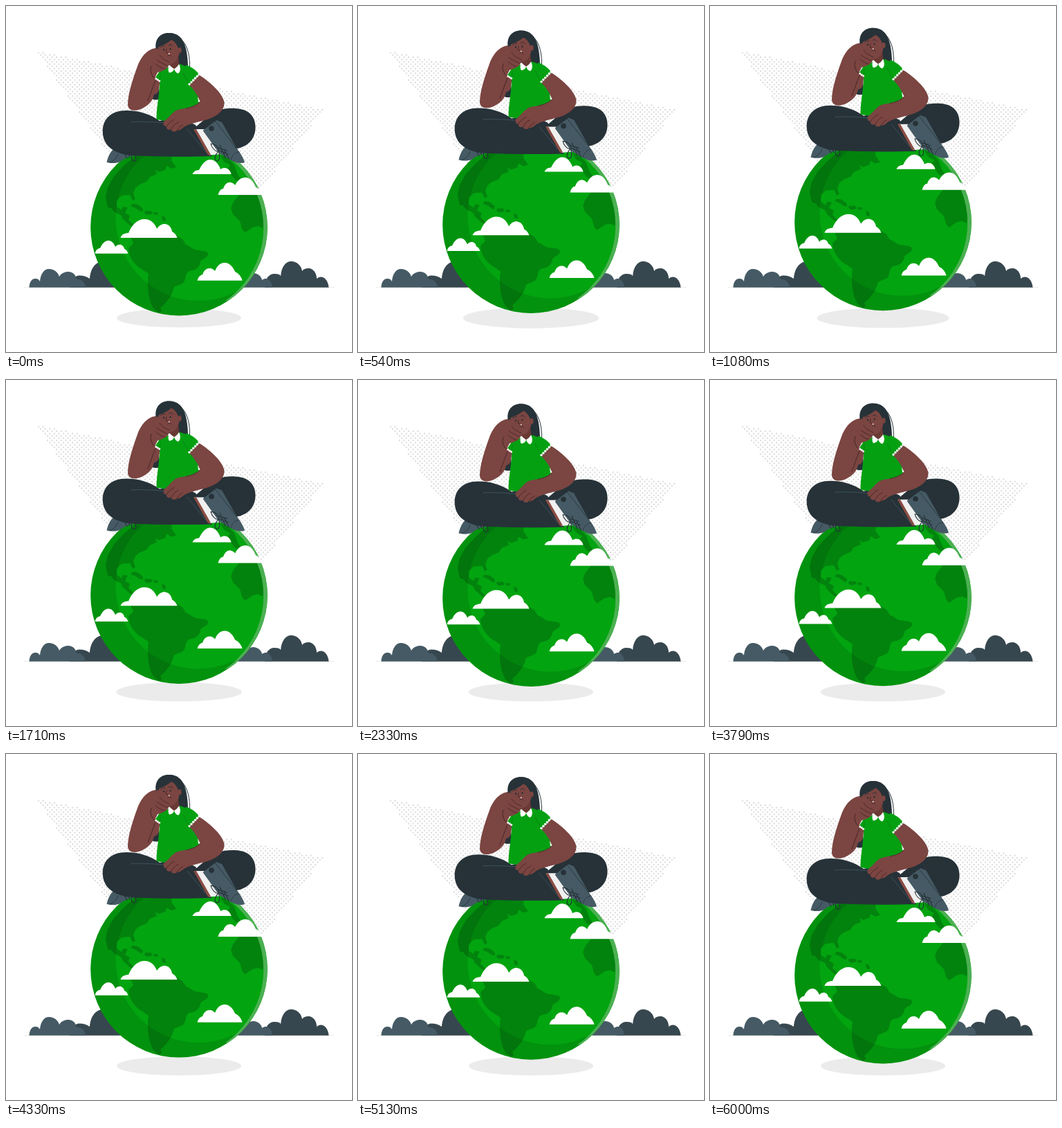
An HTML page with a canvas that plays this animation: 500 by 500 pixels, repeating every 6040 ms.

```html
<!DOCTYPE html>
<html lang="en">
<head>
<meta charset="utf-8">
<title>Thinking on top of the world</title>
<style>
html, body { margin: 0; width: 100%; height: 100%; overflow: hidden; background: #fff; }
canvas { display: block; width: 100vw; height: 100vh; }
</style>
</head>
<body>
<canvas id="stage"></canvas>
<script>
const canvas = document.getElementById('stage');
const ctx = canvas.getContext('2d');
const LOOP = 6040, FPS = 24, LAST = 144;
const INK = '#263238', SLATE = '#455a64', DARK = '#37474f';
const GREEN = '#02a410', SKIN = '#7b4541', LINE = '#3f2325';

function fill(d, color) {
  ctx.fillStyle = color;
  ctx.fill(d instanceof Path2D ? d : new Path2D(d));
}
function stroke(d, color, width) {
  ctx.strokeStyle = color;
  ctx.lineWidth = width;
  ctx.stroke(new Path2D(d));
}
function disc(x, y, rx, ry = rx) {
  const p = new Path2D();
  p.ellipse(x, y, rx, ry, 0, 0, Math.PI * 2);
  return p;
}

// Piecewise linear keyframes: [position, value]
function track(keys, p) {
  for (let i = 1; i < keys.length; i++) {
    const [a, va] = keys[i - 1], [b, vb] = keys[i];
    if (p <= b) return va + (vb - va) * (p - a) / (b - a);
  }
  return keys[keys.length - 1][1];
}
const FLOAT = [[0, 0], [0.5, -10], [1, 0]];
const BEAT = [[0, 1], [0.1, 1.1], [0.3, 1], [0.4, 1], [0.5, 1.1], [0.6, 1], [1, 1]];

// Staggered dots inside a triangle
function makeDots() {
  const p = new Path2D(), dx = 6.56, dy = 3.3;
  for (let r = 0; r < 97; r++) {
    const y = 67.5 + r * dy;
    const left = 45 + 0.703 * (y - 67);
    const right = y < 151 ? 46 + (y - 65.8) * 4.93 : 459 - 0.789 * (y - 150);
    for (let c = 0; c < 64; c++) {
      const x = 47 + (c + (r % 2) / 2) * dx;
      if (x < left || x > right) continue;
      p.moveTo(x + 1.25, y);
      p.arc(x, y, 1.25, 0, Math.PI * 2);
    }
  }
  return p;
}
const dots = makeDots();

function backdrop() {
  fill(dots, '#dfdfdf');
  fill('M25 406.4H475V406.9H25Z', '#dcdcdc');
  // left bushes
  fill('M92 406.8C94 396 99 390 105 389.5C111 389 117 391 121 394C122 380 129 369.5 140 369C155 369 168 385 168 406.8Z', DARK);
  fill('M33.5 406.8C34 398 38 393.5 43 394C46 394 48 396 49 398C50 387 55 380 62 380C70 380 75 385 77 391C80 386 85 384 90 384C97 384 101 389 102 395C108 394 114 399 115 406.8Z', SLATE);
  // right bushes
  fill('M374 406.8C374 394 380 387 388 387C393 387 396 388 397 390C398 377 404 369 412 369C421 369 427 376 428 383C430 380 433 379 437 379C444 379 449 386 449 394C456 388 465 393 466.5 406.8Z', DARK);
  fill('M335 406.8C340 392 350 386 358 386C365 387 369 391 370 396C377 391 384 396 385 406.8Z', SLATE);
}

function shadow(scale) {
  fill(disc(250, 450.8, 90 * scale, 13.7 * scale), '#ebebeb');
}

const LAND = [
  // North and Central America
  'M186 217L205 212L240 212L239 223L246 233L239 235L232 231L230 237L221 240L216 237L218 243L208 247L203 254L193 258L187 263L184 271L187 279L183 281L179 273L167 274L160 281L160 290L167 295L169 290L176 291L172 299L179 303L177 309L186 318L180 318L169 308L166 302L157 298L152 292L147 291L144 276L147 262L156 246L170 231Z',
  // Caribbean
  'M181 287C188 284 192 288 198 293L197 297C191 297 190 291 181 290Z',
  'M201 296L210 296L212 300L204 302L200 299Z',
  'M213 298L219 298L220 301L215 302Z',
  'M225 303L230 305L231 311L226 310Z',
  // South America
  'M179 332L184 343L177 350C177 362 185 374 197 381L206 387C203 404 206 425 213 437L221 444L225 441L223 436C228 432 236 424 240 415L243 406L255 401C262 396 257 387 265 383C274 382 280 378 281 369C285 364 292 364 292 358C292 353 281 354 273 352C267 349 264 346 260 345L255 337L245 331L230 330Z',
  // Africa
  'M328 284L338 271L368 271C374 288 375 304 371 321L364 318L356 320L346 327C341 325 340 318 338 311L328 301L325 292Z',
  // Europe
  'M309 215L320 219L330 230L335 244L341 252L332 252L327 246L320 236L324 230L315 225Z'
];

const CLOUDS = [
  'M269.5 243C271 239 275 237 279 237C283 229 288 222 295 222C302 222 307 228 310 236C316 232 323 234 325.5 243Z',
  'M306.5 273C308 267 311 264 314 264C316 257 321 254 325 255C328 256 330 257 331 259C335 251 340 247.7 346 247.7C354 248 358 255 361 262C365 263 368 267 370 273Z',
  'M165.5 334.9C167 330 172 328 177 328C182 316 190 308 200 308C209 308 215 314 218 322C221 317 226 314.5 230 315C236 316 239 320 240 326C244 328 246 331 247.5 334.9Z',
  'M128.5 357.7C130 352 133 350 136 350C139 343 143 339 148 339C153 339 156 343 158 348C163 342 170 345 171 351C174 352 175 354 176.5 357.7Z',
  'M276.5 396.7C278 391 281 389 284 388C286 382 290 379 294 379C298 379 300 381 302 383C305 375 310 371 316 371C323 371 328 377 331 384C336 386 340 391 341.5 396.7Z'
];

function outside(cx, cy, r, color) {
  const p = new Path2D();
  p.rect(100, 170, 300, 300);
  p.addPath(disc(cx, cy, r));
  ctx.fillStyle = color;
  ctx.fill(p, 'evenodd');
}

function globe() {
  const ball = disc(250, 319.7, 127.8);
  fill(ball, GREEN);
  ctx.save();
  ctx.clip(ball);
  LAND.forEach(d => fill(d, 'rgba(0,0,0,.2)'));
  outside(278, 306.5, 119.5, 'rgba(0,0,0,.11)');
  ctx.beginPath();
  ctx.rect(300, 200, 90, 226);
  ctx.clip();
  outside(244, 320.7, 128.2, '#4cb052');
  ctx.restore();
  CLOUDS.forEach(d => fill(d, '#fff'));
}

function legs() {
  // shoe on the left
  fill('M145.5 226C147 219 150 212 155 207L190 209L188 216C176 217 170 221 165 225C159 228 150 227 145.5 226Z', SLATE);
  stroke('M150 226C157 224 160 219 162 214', INK, 0.8);
  // far leg, then near leg
  fill('M288 163C299 151 315 147 331 148C351 148.5 360.5 160 360.5 175C360.5 194 347 205 330 206.5L290 212L268 180Z', INK);
  fill('M222 166C207 155 190 151 174 151C151 151 139.7 164 139.7 181C139.7 202 156 214.5 185 216.3C220 218 262 218 298 217L274 172L250 160Z', INK);
  stroke('M181 167.5C200 166.5 216 168 232 169M262 178L289 211', SLATE, 0.8);
  // laces on the left
  stroke('M169 210L175 220M174 209L179 219M181 210C187 215 190 222 186 224C181 225 180 217 183 210M178 212L190 216', INK, 1.1);
}

function laptop() {
  fill('M272 178L286 178L311 214L294 215.5Z', '#f0f0f0');
  fill('M271 178L275 178L296 215L292 215.5Z', '#8a4c44');
  fill('M284.5 180L304 165L312 168L333 205C339 213 343 219 345 226C337 229 327 225 319 219L308 213Z', SLATE);
  stroke('M302 166L334 207', INK, 0.8);
  fill(disc(297, 177), INK);
  fill(disc(297, 177, 3.8), INK);
  stroke('M296 199C303 199 309 206 307 210C302 211 297 204 296 199M306 211C301 217 301 223 305 224C310 223 309 215 307 210M307 205L319 209M308 209L321 214M309 201L317 219M315 207L322 221', INK, 1.1);
  stroke('M325 222C327 215 331 211 337 211', INK, 0.7);
}

function torso() {
  fill('M211 127L221 118L223 134C219 136 214 136 211 134Z', INK);
  // hair behind the neck
  fill('M217 62C215.5 49 223 39 236 39C248 39 254 46 257 53C261 61 263 76 263 91L250 92L232 84Z', INK);
  stroke('M255 50C263 59 266 73 265.5 91', INK, 1);
  // neck
  fill('M237 76L249 74L251 88L243 93L235 90Z', '#693934');
  // shirt
  fill('M235 88L222 94L215.5 104L222 109C222 128 217 147 217.5 164L230 166L252 152L283 142C283 130 276 120 265 114L279.5 99C272 90 263 84 251 84L243 92Z', '#04a012');
  stroke('M256 97C259 104 262 109 266 112M223 97L222 109', '#058010', 0.8);
  // collar
  fill('M236 85C234 89 234 94 236 96.5C240 96 242 94 243 91L239 88ZM243 91C244 94 246 97 249 97.5C252 95 253 90 250 84L247 88Z', '#fff');
}

function arms() {
  // resting arm
  fill('M279.5 100C297 111 312 126 315.3 138C317 150 306 159 291 164C276 168 265 170 257 175C253 179 249 180 247 180C243 183 238 181 239 178C234 180 231 177 232 174C227 174 226 169 230 165C237 161 240 151 252 149C264 147 274 145 280 138C277 128 271 121 265 114Z', SKIN);
  stroke('M232 174C235 169 239 166 243 164M239 178C241 173 245 170 249 168M247 180C248 177 251 174 255 172', LINE, 0.8);
  stroke('M280 139C275 144 268 146 260 148', LINE, 0.7);
  fill('M277 131L280.5 138L278 139Z', '#fff');
  // scalloped cuffs
  for (let i = 0; i < 6; i++) fill(disc(265 + i * 2.8, 113 - i * 2.9, 1.7), '#fff');
  // raised arm
  fill('M219 61C207 60 196 71 190 87C182 109 176 128 176 143C177 153 189 152 197 148C207 143 212 137 214 128C218 127 221 124 221 120L222.5 108L215.5 103L219 96C226 94 231 92 234 88L232 80L226 74L223 67Z', SKIN);
  stroke('M216 108C212 117 209 127 205 137M210 87C207 94 211 101 214 104', LINE, 0.9);
  for (let i = 0; i < 3; i++) fill(disc(216.8 + i * 2.4, 105 + i * 1.6, 1.5), '#fff');
}

function head() {
  fill('M220 58C221 50 230 46 240 48C248 49 251 55 251 63C251 72 247 80 241 83C234 85 226 79 222 70Z', SKIN);
  // fringe and side hair
  fill('M217 63C214 49 222 39 235 39C248 39 255 47 256 57C258 67 260 77 260 87L252 84C251 74 251 64 248 59C245 52 241 50 239 49C233 54 226 57 221 59Z', INK);
  fill(disc(251, 64, 2.6, 4), SKIN);
  fill(disc(228, 63, 1.1, 1.5), INK);
  fill(disc(237.5, 62, 1.1, 1.5), INK);
  stroke('M224 60C226 57 228 57 230 58M235 57C237 55 240 56 241 58', INK, 1);
  stroke('M232 62L231 67L234 67.5M234 72C236 70.5 238 71 239 73', LINE, 0.8);
  fill(disc(235.7, 69, 0.9), '#fff');
  // hand against the cheek
  fill('M214 66C217 61 221 60 222 64L223 70L231 77C237 80 237 83 235 86C230 92 220 95 213 92Z', SKIN);
  stroke('M222 71C226 77 231 79 236 81M218 78C223 82 229 84 234 87M217 84C221 88 225 90 229 91', LINE, 0.8);
}

function draw(n) {
  const sec = n / FPS;
  ctx.setTransform(canvas.width / 500, 0, 0, canvas.height / 500, 0, 0);
  ctx.fillStyle = '#fff';
  ctx.fillRect(0, 0, 500, 500);
  ctx.lineCap = 'round';
  backdrop();
  shadow(track(BEAT, sec % 6 / 6));
  ctx.translate(0, track(FLOAT, sec % 3 / 3));
  globe();
  legs();
  laptop();
  torso();
  arms();
  head();
}

function resize() {
  const ratio = window.devicePixelRatio || 1;
  canvas.width = Math.round(innerWidth * ratio);
  canvas.height = Math.round(innerHeight * ratio);
}

function tick() {
  const t = performance.now() % LOOP;
  draw(Math.min(LAST, Math.floor((t + 5) * FPS / 1000)));
  requestAnimationFrame(tick);
}

addEventListener('resize', resize);
resize();
tick();
</script>
</body>
</html>
```
